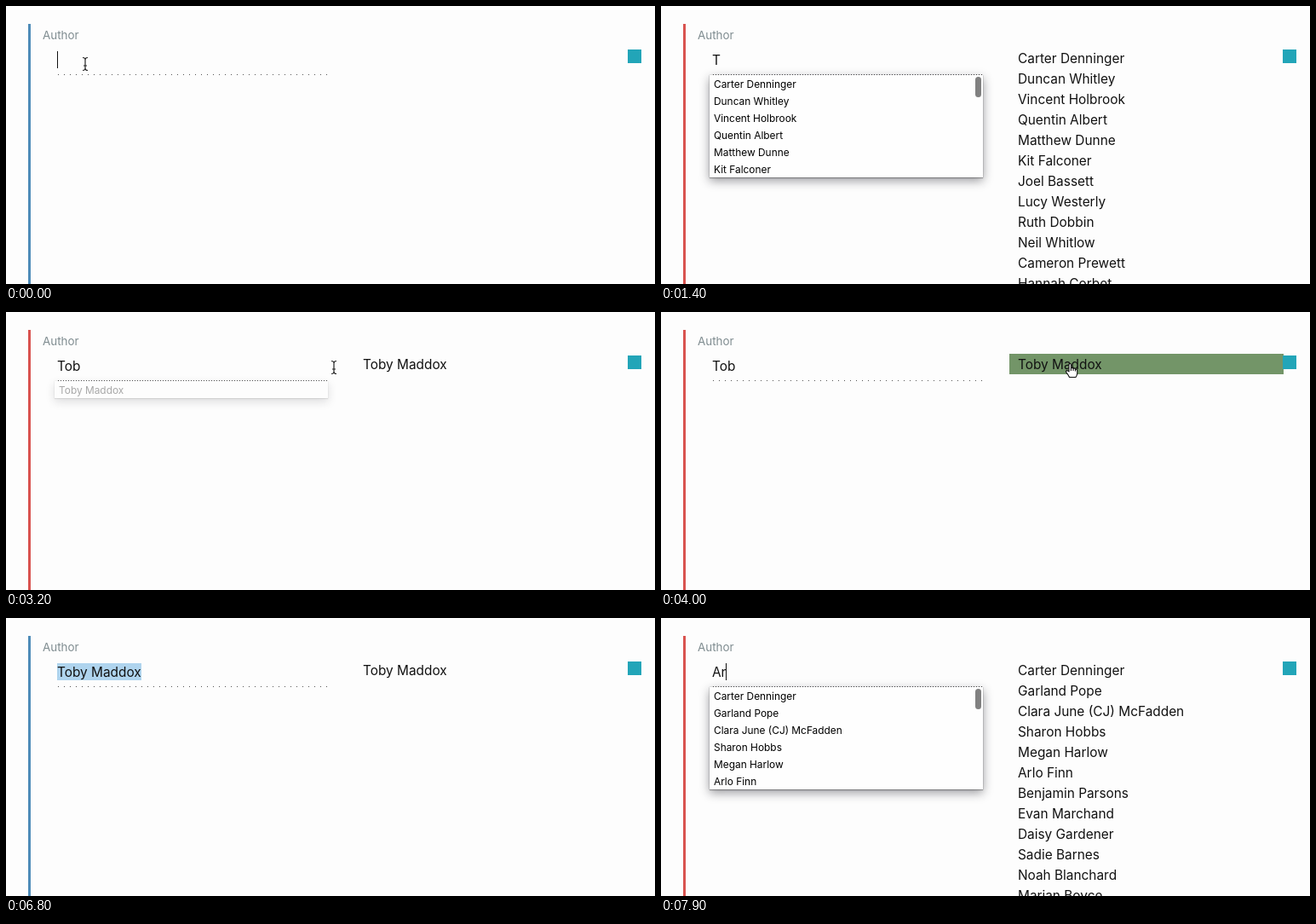
These frames come from a looping animation (762x326 px, 8000 ms). An HTML page:

```html
<!DOCTYPE html>
<html lang="en">
<head>
<meta charset="utf-8">
<title>Author autocomplete</title>
<style>
  html, body { margin: 0; width: 100%; height: 100%; overflow: hidden; background: #fdfdfd; }
  #stage {
    position: relative; width: 762px; height: 326px; overflow: hidden;
    background: #fdfdfd; color: #111;
    font: 15.4px Inter, "Open Sans", sans-serif; white-space: pre;
  }
  #stage > * { position: absolute; }
  #bar { left: 26px; top: 21px; width: 3px; height: 305px; }
  #label { left: 43px; top: 24px; line-height: 20px; font-size: 13.4px; color: #7f8c90; }
  #field { left: 60px; top: 53px; height: 20px; line-height: 22px; }
  #field span { display: inline-block; height: 20px; }
  #caret { position: absolute; left: 100%; top: 0; width: 1px; height: 20px; background: #111; }
  #line { left: 61px; top: 80px; width: 317px; height: 1px; }
  #badge { left: 730px; top: 51px; width: 16px; height: 16px; background: #22a5b8; }
  #list { left: 409px; top: 49px; width: 322px; }
  #list div { height: 24px; line-height: 26px; padding-left: 10px; }
  #popup {
    left: 57px; top: 81px; width: 321px; max-height: 120px; overflow: hidden;
    background: #fefefe; color: #000; font-size: 11.9px;
    box-shadow: 0 0 1px rgba(0,0,0,.45), 0 1px 1px rgba(0,0,0,.25), 0 4px 11px rgba(30,30,40,.45);
  }
  #popup div { height: 20px; line-height: 22px; padding-left: 5px; }
  #thumb { left: 369px; top: 83px; width: 7px; height: 24px; border-radius: 4px; background: #808080; }
  #mouse { left: 0; top: 0; overflow: visible; }
</style>
</head>
<body>
<div id="stage">
  <div id="bar"></div>
  <div id="label">Author</div>
  <div id="field"><span id="text"></span><i id="caret"></i></div>
  <div id="line"></div>
  <div id="list"></div>
  <div id="badge"></div>
  <div id="popup"></div>
  <div id="thumb"></div>
  <svg id="mouse" width="1" height="1">
    <g id="beam" fill="none">
      <path d="M-3-7.5Q0-7.5 0-5Q0-7.5 3-7.5M0-5V5M-3 7.5Q0 7.5 0 5Q0 7.5 3 7.5M-2 2H2" stroke="#fff" stroke-width="2.6"/>
      <path d="M-3-7.5Q0-7.5 0-5Q0-7.5 3-7.5M0-5V5M-3 7.5Q0 7.5 0 5Q0 7.5 3 7.5M-2 2H2" stroke="#222" stroke-width="1.2"/>
    </g>
    <path id="hand" fill="#fff" stroke="#111" stroke-width="1.1" stroke-linejoin="round"
      d="M-3 2V-6Q-3-7.5-1.8-7.5T-.6-6V-2Q1-3.4 2-1.6Q3.6-2.6 4.5-.8Q6.7-1.4 6.7 1V4Q6.7 6 5 8.5H-2.5Q-3.5 6-6.3 2.6Q-7 1-5.4.6Q-4.2.6-3 2ZM-.6-2V1M2-1.6V1M4.5-.8V1.4"/>
  </svg>
</div>
<script>
const LOOP = 8000, STEP = 100;
const $ = id => document.getElementById(id);

const names = [
  'Carter Denninger', 'Duncan Whitley', 'Vincent Holbrook', 'Quentin Albert',
  'Matthew Dunne', 'Kit Falconer', 'Joel Bassett', 'Lucy Westerly',
  'Ruth Dobbin', 'Neil Whitlow', 'Cameron Prewett', 'Hannah Corbet',
  'Grant Dalston', 'Felicia Weston', 'Ida Stopford', 'Lena Upton',
  'Monica Castorelli', 'Toby Maddox',
  'Garland Pope', 'Clara June (CJ) McFadden', 'Sharon Hobbs', 'Megan Harlow',
  'Arlo Finn', 'Benjamin Parsons', 'Evan Marchand', 'Daisy Gardener',
  'Sadie Barnes', 'Noah Blanchard', 'Marian Boyce'
];
const picked = 'Toby Maddox';

// Each track is a list of [time, value], read with hold() or blend().
const typed = [[0, ''], [800, 'T'], [1700, 'To'], [2000, 'Tob'], [4200, picked],
  [6900, ''], [7100, 'A'], [7600, 'Ar']];
const listQuery = [[0, ''], [900, 't'], [1800, 'to'], [2000, 'tob'], [6900, ''],
  [7200, 'a'], [7700, 'ar']];
const popupQuery = [[0, ''], [1000, 't'], [1800, 'to'], [2100, 'tob'], [3300, ''],
  [7200, 'a'], [7700, 'ar']];
const caretOn = [[0, 1], [500, 0], [800, 1], [1300, 0], [1700, 1], [2800, 0], [6900, 1]];
const selected = [[0, 0], [5600, 1], [6900, 0]];
const pointer = [[0, 'beam'], [200, ''], [2800, 'beam'], [3400, 'hand'], [4900, 'beam'], [6300, '']];

const blue = [78, 140, 184], red = [217, 83, 79], green = [190, 204, 155];
const barColor = [[0, blue], [800, blue], [1200, red], [4200, red], [4900, green],
  [5500, green], [5800, blue], [7000, blue], [7300, red]];
const mousePos = [[0, [93, 68]], [100, [332, 72]], [2800, [360, 64]], [3100, [362, 64]],
  [3500, [455, 66]], [3900, [482, 68]], [4600, [482, 68]], [5200, [195, 68]],
  [6000, [195, 68]], [6200, [725, 120]]];
const hover = [[0, [0]], [3400, [0]], [3700, [1]], [4800, [1]], [5100, [0]]];
const popupFade = [[0, [1]], [3000, [1]], [3300, [0]], [3400, [1]]];

function hold(track, t) {
  let value = track[0][1];
  for (const [time, v] of track) if (time <= t) value = v;
  return value;
}

function blend(track, t) {
  const i = track.findIndex(([time]) => time > t);
  if (i < 0) return track[track.length - 1][1];
  const [t0, a] = track[i - 1], [t1, b] = track[i];
  const k = (t - t0) / (t1 - t0);
  return a.map((v, j) => v + (b[j] - v) * k);
}

const matches = query =>
  query ? names.filter(name => name.toLowerCase().includes(query)) : [];

function fill(el, rows) {
  const key = rows.join();
  if (el.dataset.key === key) return;
  el.dataset.key = key;
  el.replaceChildren(...rows.map(row => {
    const div = document.createElement('div');
    div.textContent = row;
    return div;
  }));
}

const show = (el, on) => { el.style.visibility = on ? 'visible' : 'hidden'; };
const dots = gap => `repeating-linear-gradient(90deg, #555 0 1px, transparent 1px ${gap}px)`;

function draw(t) {
  $('bar').style.background = `rgb(${blend(barColor, t)})`;
  $('text').textContent = hold(typed, t);
  $('text').style.background = hold(selected, t) ? '#afd4ee' : 'none';
  show($('caret'), hold(caretOn, t));

  const found = matches(hold(listQuery, t));
  fill($('list'), found.slice(0, 12));
  if (found.length) {
    $('list').firstChild.style.background = `rgba(115, 149, 104, ${blend(hover, t)[0]})`;
  }

  const options = matches(hold(popupQuery, t));
  const open = options.length > 0;
  fill($('popup'), options.slice(0, 6));
  show($('popup'), open);
  $('popup').style.opacity = blend(popupFade, t)[0];
  show($('thumb'), options.length > 6);
  $('line').style.background = dots(open ? 3 : 7);

  const shape = hold(pointer, t), [x, y] = blend(mousePos, t);
  for (const id of ['beam', 'hand']) {
    show($(id), shape === id);
    $(id).setAttribute('transform', `translate(${Math.round(x)} ${Math.round(y)})`);
  }
}

const start = performance.now();
function tick() {
  const t = (performance.now() - start) % LOOP;
  draw(Math.floor(t / STEP) * STEP);
  requestAnimationFrame(tick);
}
tick();
</script>
</body>
</html>
```
